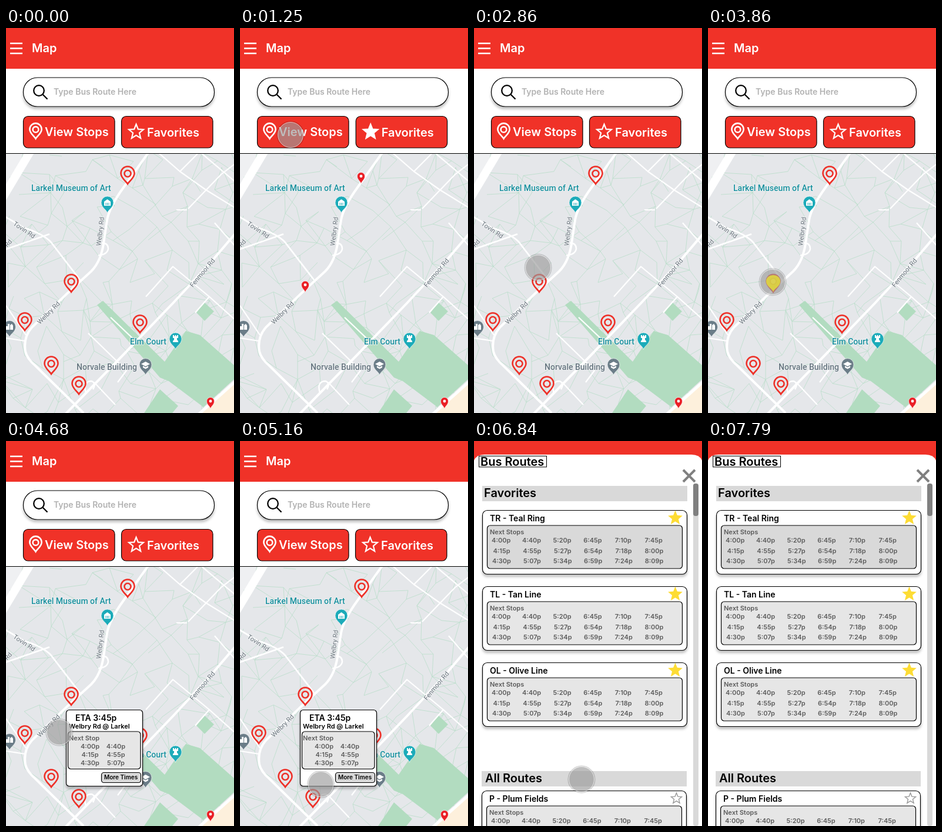
Write an HTML page that moves like this. It is 388 px wide and 652 px high and loops after 8 s.

```html
<!DOCTYPE html>
<html lang="en">
<head>
<meta charset="utf-8">
<title>Bus map</title>
<style>
  html, body { margin: 0; width: 100%; height: 100%; overflow: hidden; background: #fff; }
  svg { display: block; width: 388px; height: 652px; font-family: Inter, Roboto, sans-serif; font-weight: 600; }
  .h { font-size: 20px; }
  .m { font-size: 14px; }
  .s { font-size: 11px; }
  .w { fill: #fff; }
  .dim { fill: #5c5c5c; }
  .place, .road { paint-order: stroke; stroke: #f2f4f5; stroke-width: 1.5px; }
  .place { font: 500 14px Roboto, "Open Sans", sans-serif; }
  .road { font: 400 11px Roboto, sans-serif; fill: #68727b; }
  .streets path { fill: none; stroke: #fff; stroke-linejoin: round; }
  .lift { filter: drop-shadow(0 4px 2px rgba(0,0,0,.25)); }
  .box { stroke: #000; stroke-width: 1.2; }
  #halo { fill: none; stroke: rgba(0,0,0,.16); stroke-width: 2; }
  #disc { fill: rgba(155,155,155,.65); stroke: rgba(255,255,255,.6); stroke-width: 1; }
  .down #disc { fill: rgba(105,105,105,.65); stroke: none; }
</style>
</head>
<body>
<svg viewBox="0 0 388 652">
  <defs>
    <g id="pin" fill="none">
      <path d="M0 18C-3 13-11.5 8-11.5 0A11.5 11.5 0 1 1 11.5 0C11.5 8 3 13 0 18Z"/>
      <circle cy=".5" r="5.5"/>
    </g>
    <g id="dot">
      <path fill="#ea1f25" stroke="#fff" stroke-width=".6" d="M0 13C-1 8-6.5 6-6.5 0A6.5 6.5 0 1 1 6.5 0C6.5 6 1 8 0 13Z"/>
      <circle r="2.4" fill="#fff"/>
    </g>
    <path id="drop" d="M0 18C-1 12-10.5 9-10.5 0A10.5 10.5 0 1 1 10.5 0C10.5 9 1 12 0 18Z"/>
    <path id="star"/>
    <clipPath id="mapArea"><rect y="213" width="388" height="439"/></clipPath>
  </defs>

  <rect width="388" height="652" fill="#fff"/>
  <g clip-path="url(#mapArea)">
    <rect y="213" width="388" height="439" fill="#e5e7ea"/>
    <path d="M0 213H40L0 275Z" fill="#eff0f2"/>
    <path id="trails" fill="none" stroke="#b9ddca" stroke-width=".8"/>
    <g fill="#b2dcc0">
      <path d="M155 469L165 462L270 565L306 513L330 520L388 571V595L336 642L277 598L262 592Z"/>
      <path d="M338 465L354 480L338 496L324 482Z"/>
      <path d="M262 612L293 640L283 652H235Z"/>
    </g>
    <path d="M388 602L332 652H388Z" fill="#fdf0dc"/>
    <g class="streets">
      <path stroke-width="14" d="M42 208L-6 288"/>
      <path stroke-width="4" d="M243 210L200 270Q176 303 172 325L167 358Q163 394 145 412L111 443L44 507Q29 524 33 548Q36 560 50 572L132 652"/>
      <path stroke-width="4" d="M392 346L350 395L285 465L200 553L100 655"/>
      <path stroke-width="5" d="M392 597L328 654"/>
      <path stroke-width="2.8" d="M-4 318L30 338Q62 348 76 362L127 428M-4 376L74 349M127 428L111 443"/>
      <path stroke-width="2.2" d="M258 210L296 243L340 274L392 306M296 243L326 213M310 306L366 248L392 228M330 210L392 262M355 330L392 372M290 308H308"/>
      <path stroke-width="2.2" d="M238 455L284 404L346 455L322 482M346 455L392 496M316 432L302 448"/>
      <path stroke-width="2.2" d="M140 517L205 580L190 600M178 490L216 526M150 600L186 638M0 470L34 520M0 525L32 530"/>
      <path stroke-width="2.5" d="M163 364Q174 364 174 374Q172 384 157 385"/>
      <path stroke-width="2.5" d="M118 638L136 618Q130 598 146 598Q154 602 148 612"/>
    </g>
    <g class="road" text-anchor="middle">
      <text transform="translate(29 345) rotate(34)">Tovin Rd</text>
      <text transform="translate(164 345) rotate(-83)">Welbry Rd</text>
      <text transform="translate(75 485) rotate(-45)">Welbry Rd</text>
      <text transform="translate(337 417) rotate(-50)">Fenmoor Rd</text>
      <text transform="translate(4 370) rotate(-48)">y Rd</text>
    </g>
    <g class="place">
      <g fill="#168f9d">
        <text x="43" y="276">Larkel Museum of Art</text>
        <text x="273" y="536" text-anchor="end">Elm Court</text>
      </g>
      <text x="223" y="579" text-anchor="end" fill="#65747f">Norvale Building</text>
    </g>
    <g stroke="#fff" stroke-width=".6">
      <use href="#drop" x="172.500" y="295.500" fill="#1cabb9"/>
      <use href="#drop" x="288.500" y="526.500" fill="#1cabb9"/>
      <use href="#drop" x="237.500" y="570" fill="#6b7d88"/>
      <use href="#drop" x="6" y="506" fill="#6b7d88"/>
    </g>
    <g fill="#fff">
      <path d="M167 294L172.500 290L178 294V301H167Z"/>
      <path d="M284 532H293V530L291 528V525H293V520H291V522H289.500V520H287.500V522H286V520H284V525H286V528L284 530Z"/>
      <path d="M230 569L237.500 565L245 569L237.500 573ZM233 572L237.500 574.500L242 572V575L237.500 577.500L233 575Z"/>
      <path d="M0 511V505H3V501H6V511ZM7 511V503L10 501L12 504V511Z"/>
    </g>
    <path d="M170 300V296M172.500 300V296M175 300V296" stroke="#1cabb9"/>
    <use href="#dot" x="348" y="632"/>
    <g id="stops" stroke="#ee3028" stroke-width="2.6"></g>
    <g id="favs">
      <use href="#dot" x="206" y="251"/>
      <use href="#dot" x="111" y="435"/>
    </g>
  </g>

  <rect width="388" height="69" fill="#f03228"/>
  <path d="M7 26H28M7 34.500H28M7 43H28" stroke="#fff" stroke-width="2.500"/>
  <text class="h w" x="44" y="41">Map</text>
  <rect class="box lift" x="29.500" y="84" width="325" height="49" rx="24" fill="#fff"/>
  <g fill="none" stroke="#000" stroke-width="2.3">
    <circle cx="56" cy="106" r="8.800"/>
    <path d="M62.500 112.500L70.500 120.500"/>
  </g>
  <text class="m" x="81" y="113" fill="#b2b2b2">Type Bus Route Here</text>
  <rect class="box" x="29.500" y="149.500" width="155.500" height="53.500" rx="8" fill="#f03228"/>
  <use href="#pin" transform="translate(50.500 171.500) scale(.88)" stroke="#fff" stroke-width="3"/>
  <text class="h w" x="66" y="183">View Stops</text>
  <g id="favButton">
    <rect class="box" x="196.500" y="149.500" width="155.500" height="53.500" rx="8" fill="#f03228"/>
    <use id="favStar" href="#star" transform="translate(221.500 176) scale(13)" stroke="#fff" stroke-width=".17"/>
    <text class="h w" x="240" y="184">Favorites</text>
  </g>
  <path d="M0 212.500H388" stroke="#000"/>

  <g id="popup">
    <rect class="box lift" x="102.500" y="455.500" width="130" height="129" rx="5" fill="#fff"/>
    <text class="m" x="118" y="474">ETA 3:45p</text>
    <text class="s" x="107" y="487">Welbry Rd @ Larkel</text>
    <rect class="box" x="105.500" y="492" width="123.500" height="63.500" rx="5" fill="#e6e6e6"/>
    <text class="s dim" x="107" y="507">Next Stop</text>
    <g id="popTimes"></g>
    <rect class="box" x="162.500" y="561.500" width="67" height="17" rx="4" fill="#d9d9d9"/>
    <text x="167" y="573" font-size="10">More Times</text>
  </g>

  <g id="routes">
    <rect width="388" height="60" fill="#f03228"/>
    <path d="M0 652V33Q4 23 18 23H370Q384 23 388 33V652Z" fill="#fff"/>
    <rect x="8.500" y="25.500" width="115" height="18.500" fill="none" stroke="#000"/>
    <text class="h" x="11" y="42">Bus Routes</text>
    <path d="M356 49L376 69M376 49L356 69" stroke="#808080" stroke-width="4"/>
    <rect x="373" y="72" width="9" height="580" rx="4" fill="#d9d9d9"/>
    <rect x="373" y="72" width="9" height="55" rx="4" fill="#808080"/>
    <rect x="14" y="76" width="349" height="26" fill="#d9d9d9"/>
    <text class="h" x="17" y="95">Favorites</text>
    <rect x="13" y="559" width="349" height="26" fill="#d9d9d9"/>
    <text class="h" x="19" y="578">All Routes</text>
    <g id="cards"></g>
  </g>

  <g id="hot" transform="translate(111 429)">
    <use href="#drop" fill="#f5e600" transform="scale(1.150 1)"/>
    <circle r="5.200" fill="#fff35a" stroke="#d8a800" stroke-width="2"/>
  </g>
  <g id="cursor">
    <circle id="halo" r="22.500"/>
    <circle id="disc" r="21.500"/>
  </g>
  <use id="glow" href="#drop" transform="translate(111 429) scale(1.150 1)" fill="#f0e030" opacity=".6"/>
</svg>
<script>
const LOOP = 8000;
const $ = id => document.getElementById(id);

// Five-pointed unit star
$('star').setAttribute('d', 'M' + Array.from({ length: 10 }, (_, i) => {
  const r = i % 2 ? 0.44 : 1, a = i * Math.PI / 5;
  return `${(r * Math.sin(a)).toFixed(3)} ${(-r * Math.cos(a)).toFixed(3)}`;
}).join('L') + 'Z');

// Footpaths: a jittered grid joined at random
let seed = 11;
const rand = () => (seed = seed * 16807 % 2147483647) / 2147483647;
function drawTrails() {
  const cols = 14, rows = 16, gap = 30, pts = [];
  for (let i = 0; i < cols * rows; i++) {
    pts.push([(i % cols) * gap - 8 + rand() * 25, 205 + Math.floor(i / cols) * gap + rand() * 25]);
  }
  let d = '';
  pts.forEach((p, i) => {
    for (const [step, odds] of [[1, .35], [cols, .4], [cols + 1, .45], [cols - 1, .4]]) {
      const q = pts[i + step];
      if (q && Math.abs(q[0] - p[0]) < 80 && rand() < odds) {
        d += `M${p.map(Math.round)}L${q.map(Math.round)}`;
      }
    }
  });
  $('trails').setAttribute('d', d);
}
drawTrails();

$('stops').innerHTML = [[207, 246], [111, 429], [32, 494], [228, 498], [77, 568], [124, 602]]
  .map(([x, y]) => `<use href="#pin" x="${x}" y="${y}"/>`).join('');

const times = [
  '4:00p 4:40p 5:20p 6:45p 7:10p 7:45p',
  '4:15p 4:55p 5:27p 6:54p 7:18p 8:00p',
  '4:30p 5:07p 5:34p 6:59p 7:24p 8:09p'
].map(row => row.split(' '));

// Rows of centred departure times
const timeGrid = (x, y, dx, dy, cols) => times.map((row, r) => row.slice(0, cols).map((t, c) =>
  `<text class="s dim" text-anchor="middle" x="${x + c * dx + (r && cols > 2 ? .8 : 0)}" y="${y + r * dy}">${t}</text>`
).join('')).join('');

$('popTimes').innerHTML = timeGrid(143, 521, 44, 14, 2);

const card = (x, y, name, fill, fav) => `<g transform="translate(${x} ${y})">
  <rect class="box lift" x=".5" y=".5" width="348" height="108" rx="8" fill="#fff"/>
  <text class="m" x="13" y="19">${name}</text>
  <rect class="box" x="8.500" y="26" width="332" height="73" rx="5" fill="${fill}"/>
  <text class="s dim" x="13" y="41">Next Stops</text>
  ${timeGrid(32.2, 55, 51.9, 17.7, 6)}
  <use href="#star" transform="translate(${fav ? '328.5 13.5) scale(13' : '331.5 13.5) scale(9.5'})"
    ${fav ? 'fill="#fddc34"' : 'fill="#fff" stroke="#999" stroke-width=".15"'}/></g>`;

$('cards').innerHTML =
  card(14, 117, 'TR - Teal Ring', '#d9d9d9', true) +
  card(14, 246, 'TL - Tan Line', '#e6e6e6', true) +
  card(14, 375, 'OL - Olive Line', '#e6e6e6', true) +
  card(13, 592, 'P - Plum Fields', '#e6e6e6', false);

// Cursor moves: start, end, number of steps, easing power, cubic Bezier points
const moves = [
  [500, 780, 5, 2, [-40, 258], [0, 236], [50, 196], [86, 181]],
  [2380, 3000, 10, 2, [86, 181], [99, 257], [107, 340], [110, 430]],
  [4470, 5230, 12, 1.1, [110, 430], [78, 480], [82, 566], [150, 586]],
  [5300, 5720, 7, 1.6, [150, 586], [160, 588], [174, 582], [183, 573]],
  [7440, 7790, 6, 1.2, [183, 573], [240, 570], [340, 520], [420, 448]]
];
const presses = [[1180, 1250], [2120, 2180], [3930, 4000], [6780, 6840]];

function cursorAt(t) {
  const [a, b, n, power, ...p] = moves.filter(m => t >= m[0]).pop() || moves[0];
  const k = Math.min(n, Math.floor((t - a) / (b - a) * (n - 1) + 1e-6) + 1) / n;
  const u = 1 - (1 - k) ** power, v = 1 - u;
  return [0, 1].map(i =>
    v ** 3 * p[0][i] + 3 * v * v * u * p[1][i] + 3 * v * u * u * p[2][i] + u ** 3 * p[3][i]);
}

const within = (t, a, b) => t >= a && t < b;
const show = (id, on) => $(id).setAttribute('display', on ? 'inline' : 'none');

function render(t) {
  const favs = within(t, 1250, 2180);
  show('favs', favs);
  show('stops', !favs);
  $('favStar').setAttribute('fill', favs ? '#fff' : 'none');
  $('favButton').setAttribute('transform', `translate(${favs ? 0.7 : 0} 0)`);
  show('popup', within(t, 4000, 6840));
  show('routes', t >= 6840);
  const hot = within(t, 3860, 4000);
  show('hot', hot);
  show('glow', hot);

  const on = within(t, 500, 7790);
  show('cursor', on);
  if (!on) return;
  const [x, y] = cursorAt(t);
  $('cursor').setAttribute('transform', `translate(${x.toFixed(2)} ${y.toFixed(2)})`);
  $('cursor').classList.toggle('down', presses.some(([a, b]) => within(t, a, b)));
}

const start = performance.now();
(function tick() {
  render((performance.now() - start) % LOOP);
  requestAnimationFrame(tick);
})();
</script>
</body>
</html>
```
